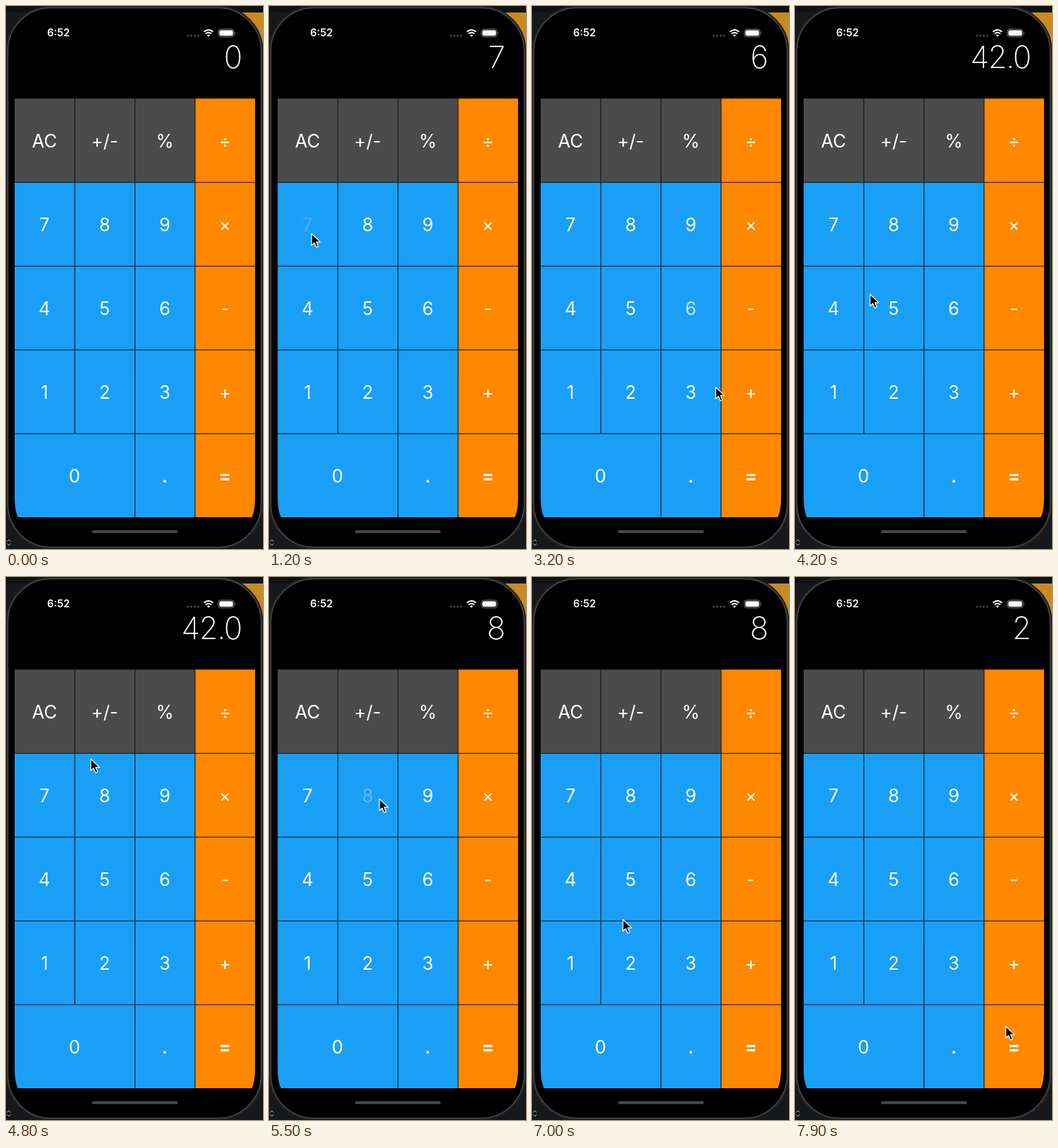
An HTML page that plays this animation: 356 px wide and 752 px high, repeating every 8 s.

```html
<!DOCTYPE html>
<html lang="en">
<head>
<meta charset="utf-8">
<title>Calculator</title>
<style>
  html, body { margin: 0; width: 100%; height: 100%; overflow: hidden; background: #17181b; }
  svg { display: block; width: 356px; height: 752px; }
  text { font-family: Inter, "Liberation Sans", sans-serif; fill: #fff; }
  #keys text { font-size: 25px; text-anchor: middle; }
  #readout { font-size: 42.8px; font-weight: 150; letter-spacing: -1.5px; text-anchor: end; }
  #clock { font-size: 14.3px; font-weight: 600; }
</style>
</head>
<body>
<svg viewBox="0 0 356 752" xmlns="http://www.w3.org/2000/svg">
  <defs>
    <clipPath id="screen">
      <path d="M12 120H345V682Q345 698 340.500 708H16.500Q12 698 12 682Z"/>
    </clipPath>
  </defs>

  <!-- desktop behind the phone -->
  <rect width="356" height="752" fill="#17181b"/>
  <rect width="356" height="9" fill="#101113"/>
  <rect x="326" y="9" width="30" height="69" fill="#c98a20"/>
  <path d="M0 78.500H4M0 668.500H4" stroke="#303136"/>
  <path d="M1.500 741.500L4 739L6.500 741.500M1.500 744.500L4 747L6.500 744.500" fill="none" stroke="#b5b5b5"/>

  <!-- phone body -->
  <rect x="1.500" y="1.500" width="353" height="749" rx="61" fill="#000" stroke="#202122" stroke-width="4"/>
  <rect x="2.500" y="2.500" width="351" height="747" rx="60" fill="#000" stroke="#484949" stroke-width="1.500"/>

  <!-- status bar -->
  <text id="clock" x="57" y="42.300">6:52</text>
  <path d="M252 41H267" stroke="#444" stroke-width="3" stroke-linecap="round" stroke-dasharray="0 4.700"/>
  <g fill="none" stroke="#fff" stroke-width="2">
    <path d="M274.200 35.800Q280.500 30.200 286.800 35.800"/>
    <path d="M276.500 38.500Q280.500 35 284.500 38.500"/>
  </g>
  <path d="M278.300 40.300Q280.500 38.700 282.700 40.300L280.500 42.800Z" fill="#fff"/>
  <rect x="294" y="32" width="22" height="10.800" rx="3.500" fill="none" stroke="#777"/>
  <rect x="295.500" y="33.500" width="19" height="7.800" rx="2.300" fill="#fff"/>
  <path d="M317.300 35.500Q319 37.400 317.300 39.300Z" fill="#777"/>

  <text id="readout" x="326" y="86"></text>
  <g id="keys" clip-path="url(#screen)"></g>
  <rect x="119" y="726" width="119" height="4" rx="2" fill="#464646"/>

  <path id="cursor" d="M1 1.200V17.500L4.800 14L7.400 20.200L10.300 19L7.700 12.900H13Z"
        fill="#000" stroke="#fff" stroke-width="1.200" stroke-linejoin="round"/>
</svg>
<script>
const LOOP = 8000, STEP = 100, HOLD = 100, FADE = 450;
const LEFT = 12, TOP = 128.2, KEY_W = 83.3, KEY_H = 116;
const NS = 'http://www.w3.org/2000/svg';
const $ = id => document.getElementById(id);
const labels = {};

function add(tag, attrs, parent) {
  const el = document.createElementNS(NS, tag);
  for (const name in attrs) el.setAttribute(name, attrs[name]);
  return parent.appendChild(el);
}

function addKey(name, row, col) {
  const x = LEFT + col * KEY_W, y = TOP + row * KEY_H;
  const width = KEY_W * (name === '0' ? 2 : 1);
  const fill = col === 3 ? '#ff8800' : row === 0 ? '#4b4b4b' : '#1a9ff6';
  add('rect', { x, y, width, height: KEY_H, fill }, $('keys'));
  // dividers along the inner edges only
  const d = (col ? `M${x} ${y}v${KEY_H}` : '') + (row ? `M${x} ${y}h${width}` : '');
  add('path', { d, stroke: '#0b1a26', 'stroke-width': 1.1 }, $('keys'));
  const weight = { '=': 700, '.': 600 }[name] || 400;
  labels[name] = add('text', { x: x + width / 2 - 0.3, y: y + 67.6, 'font-weight': weight }, $('keys'));
  labels[name].textContent = name;
}

// "_" is the space covered by the wide zero
['AC +/- % ÷', '7 8 9 ×', '4 5 6 -', '1 2 3 +', '0 _ . ='].forEach((line, row) =>
  line.split(' ').forEach((name, col) => name !== '_' && addKey(name, row, col)));

const taps = [
  { key: '7', up: 1200, shows: '7' },
  { key: '×', up: 2150 },
  { key: '6', up: 2900, shows: '6' },
  { key: '=', up: 3700, shows: '42.0' },
  { key: '8', up: 5450, shows: '8' },
  { key: '÷', up: 6500 },
  { key: '2', up: 7500, shows: '2' }
];

// pointer moves: start, end, x, y
const moves = [
  [300, 1000, 58, 314], [1400, 2000, 288, 309], [2200, 2600, 208, 417],
  [3000, 3400, 299, 636], [3800, 4200, 103, 398], [4200, 4600, 78, 230],
  [4600, 4900, 130, 258], [5000, 5300, 152, 306], [5900, 6300, 296, 196],
  [6550, 7000, 125, 473], [7000, 7300, 130, 545], [7500, 7900, 291, 621]
];

const clamp = v => Math.min(1, Math.max(0, v));
const ease = k => k * k * (3 - 2 * k);

function pointer(t) {
  let x = 354, y = 430;
  for (const [start, end, toX, toY] of moves) {
    const k = ease(clamp((t - start) / (end - start)));
    x += (toX - x) * k;
    y += (toY - y) * k;
  }
  return [x, y];
}

function draw(t) {
  let shown = '0';
  for (const { key, up, shows } of taps) {
    if (t >= up && shows) shown = shows;
    const alpha = t < up - HOLD ? 1 : 0.2 + 0.8 * clamp((t - up) / FADE);
    labels[key].setAttribute('fill-opacity', alpha);
  }
  $('readout').textContent = shown;
  $('cursor').setAttribute('visibility', t > moves[0][0] ? 'visible' : 'hidden');
  $('cursor').setAttribute('transform', `translate(${pointer(t)})`);
}

function tick() {
  const t = performance.now() % LOOP;
  draw(Math.floor(t / STEP) * STEP);
  requestAnimationFrame(tick);
}
tick();
</script>
</body>
</html>
```
